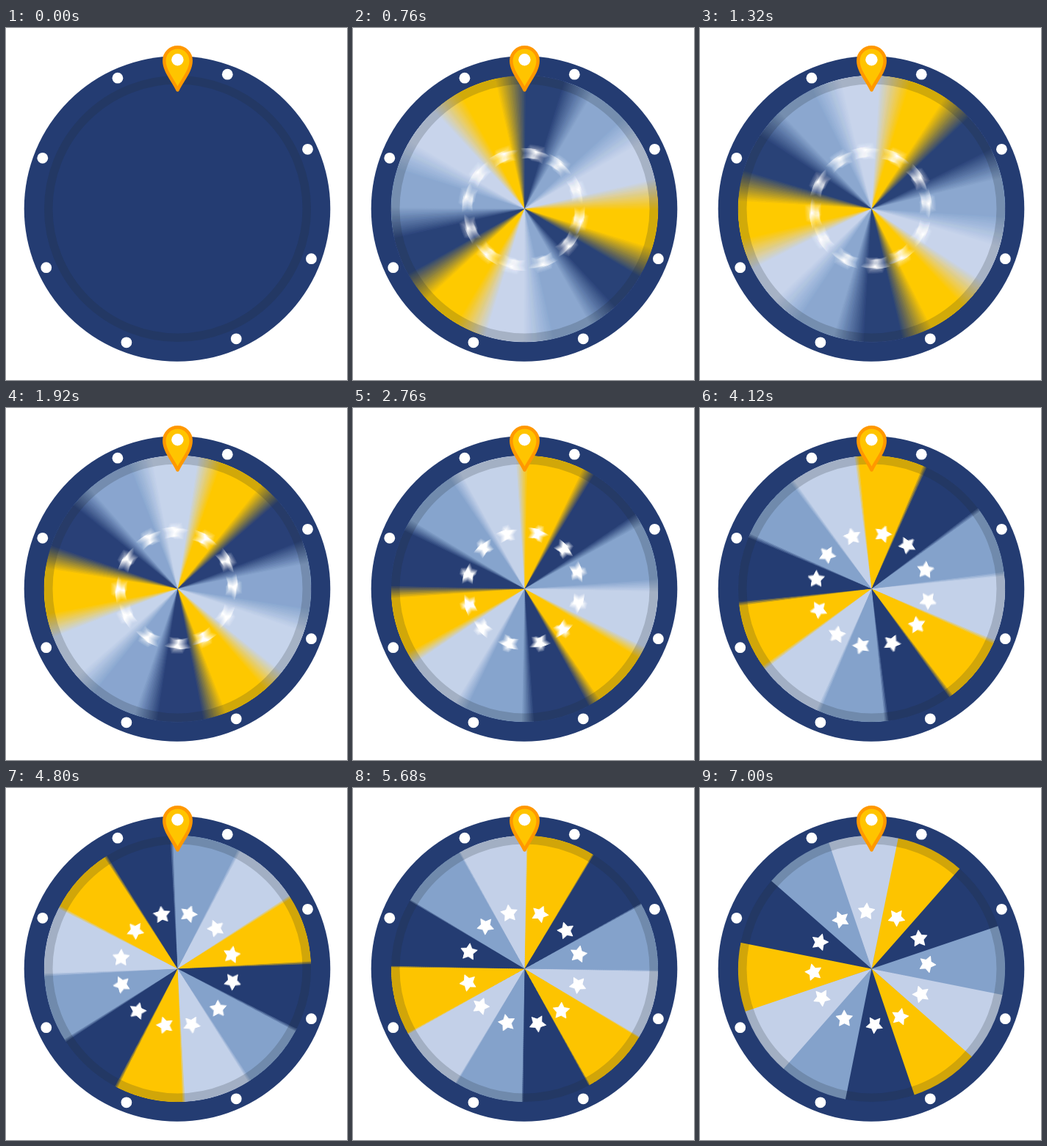
Write an HTML page with a canvas that moves like this. It is 464x480 px and loops after 7.2 s.

```html
<!DOCTYPE html>
<html lang="en">
<head>
<meta charset="utf-8">
<title>Prize wheel</title>
<style>
  html, body { margin: 0; width: 100%; height: 100%; overflow: hidden; background: #fff; }
  canvas { display: block; }
</style>
</head>
<body>
<canvas id="stage" width="464" height="480"></canvas>
<script>
const ctx = document.getElementById('stage').getContext('2d');
const LOOP = 7200, SHUTTER = 20, WHEEL_IN = 40;
const CX = 233.5, CY = 246.5, RADIUS = 181.5, SCALE = 2;
const NAVY = '#243c72', YELLOW = '#fdc400', BLUE = '#84a2cb', PALE = '#c3d0e8';
const rad = deg => deg * Math.PI / 180;

// Spin keys: time in ms, degrees left to turn, speed in degrees per second.
const SPIN = [
  [0, -1800, 0], [1320, -1082, 690], [1920, -718, 530], [2760, -373, 285],
  [3520, -214, 150], [4800, -74, 85], [5980, 0, 20]
];

function angleAt(t) {
  if (t <= 0 || t >= SPIN[SPIN.length - 1][0]) return 0;
  const i = SPIN.findIndex(key => key[0] > t);
  const [t0, a0, v0] = SPIN[i - 1], [t1, a1, v1] = SPIN[i];
  const span = (t1 - t0) / 1000, u = (t - t0) / (t1 - t0), w = 1 - u;
  return w * w * (1 + 2 * u) * a0 + u * u * (3 - 2 * u) * a1
    + span * u * w * (w * v0 - u * v1);
}

function disc(c, x, y, r, color) {
  c.fillStyle = color;
  c.beginPath();
  c.arc(x, y, r, 0, 2 * Math.PI);
  c.fill();
}

function star(c, x, y, turn) {
  c.beginPath();
  for (let i = 0; i < 10; i++) {
    const r = i % 2 ? 6 : 11.6, a = turn + i * Math.PI / 5;
    c.lineTo(x + r * Math.sin(a), y - r * Math.cos(a));
  }
  c.closePath();
  c.fillStyle = c.strokeStyle = '#fff';
  c.lineWidth = 1;
  c.lineJoin = 'round';
  c.fill();
  c.stroke();
}

function makeWheel() {
  const sprite = document.createElement('canvas');
  sprite.width = sprite.height = 2 * SCALE * (RADIUS + 1);
  const c = sprite.getContext('2d');
  c.scale(SCALE, SCALE);
  c.translate(RADIUS + 1, RADIUS + 1);
  for (let k = 0; k < 12; k++) {
    const from = rad(11.3 + 30 * k - 90);
    c.fillStyle = [YELLOW, NAVY, BLUE, PALE][k % 4];
    c.beginPath();
    c.moveTo(0, 0);
    c.arc(0, 0, RADIUS, from, from + rad(30.2));
    c.fill();
  }
  for (let k = 0; k < 12; k++) {
    const a = rad(-4.1 + 30 * k + 1.4 * (k % 3));
    star(c, -1.6 + 77.5 * Math.sin(a), -0.7 - 77.5 * Math.cos(a), a + rad(8));
  }
  return sprite;
}
const wheel = makeWheel();

// Average several poses across the shutter time for motion blur.
function drawWheel(t) {
  const start = angleAt(t - SHUTTER / 2), end = angleAt(t + SHUTTER / 2);
  const turn = t < SHUTTER / 2 ? 0 : end - start;
  const samples = Math.max(1, Math.ceil(Math.abs(turn) / 0.6));
  const half = RADIUS + 1;
  for (let i = 0; i < samples; i++) {
    ctx.save();
    ctx.globalAlpha = 1 / (i + 1);
    ctx.translate(CX, CY);
    ctx.rotate(rad(start + turn * (i + 0.5) / samples));
    ctx.drawImage(wheel, -half, -half, 2 * half, 2 * half);
    ctx.restore();
  }
}

const pin = new Path2D('M233.5 84.5C228 72 215.3 59 215.3 44.5A18.2 18.2 0 0 1 251.7 44.5C251.7 59 239 72 233.5 84.5Z');

function drawPin() {
  ctx.fillStyle = '#ffc400';
  ctx.strokeStyle = '#ff9800';
  ctx.lineWidth = 4.5;
  ctx.lineJoin = 'round';
  ctx.fill(pin);
  ctx.stroke(pin);
  disc(ctx, 233.4, 43.3, 8.2, '#fff');
}

function draw(t) {
  ctx.fillStyle = '#fff';
  ctx.fillRect(0, 0, 464, 480);
  disc(ctx, 233, CY, 208.3, NAVY);
  if (t >= WHEEL_IN) drawWheel(t);

  ctx.strokeStyle = 'rgba(34, 42, 46, 0.2)';
  ctx.lineWidth = 11.5;
  ctx.beginPath();
  ctx.arc(CX, CY, RADIUS - 5.75, 0, 2 * Math.PI);
  ctx.stroke();

  for (let k = 0; k < 8; k++) {
    const a = rad(20.6 + 45 * k);
    disc(ctx, 232.6 + 195.3 * Math.sin(a), 246 - 195.3 * Math.cos(a), 7.4, '#fff');
  }
  drawPin();
}

function tick() {
  draw(performance.now() % LOOP);
  requestAnimationFrame(tick);
}
tick();
</script>
</body>
</html>
```
